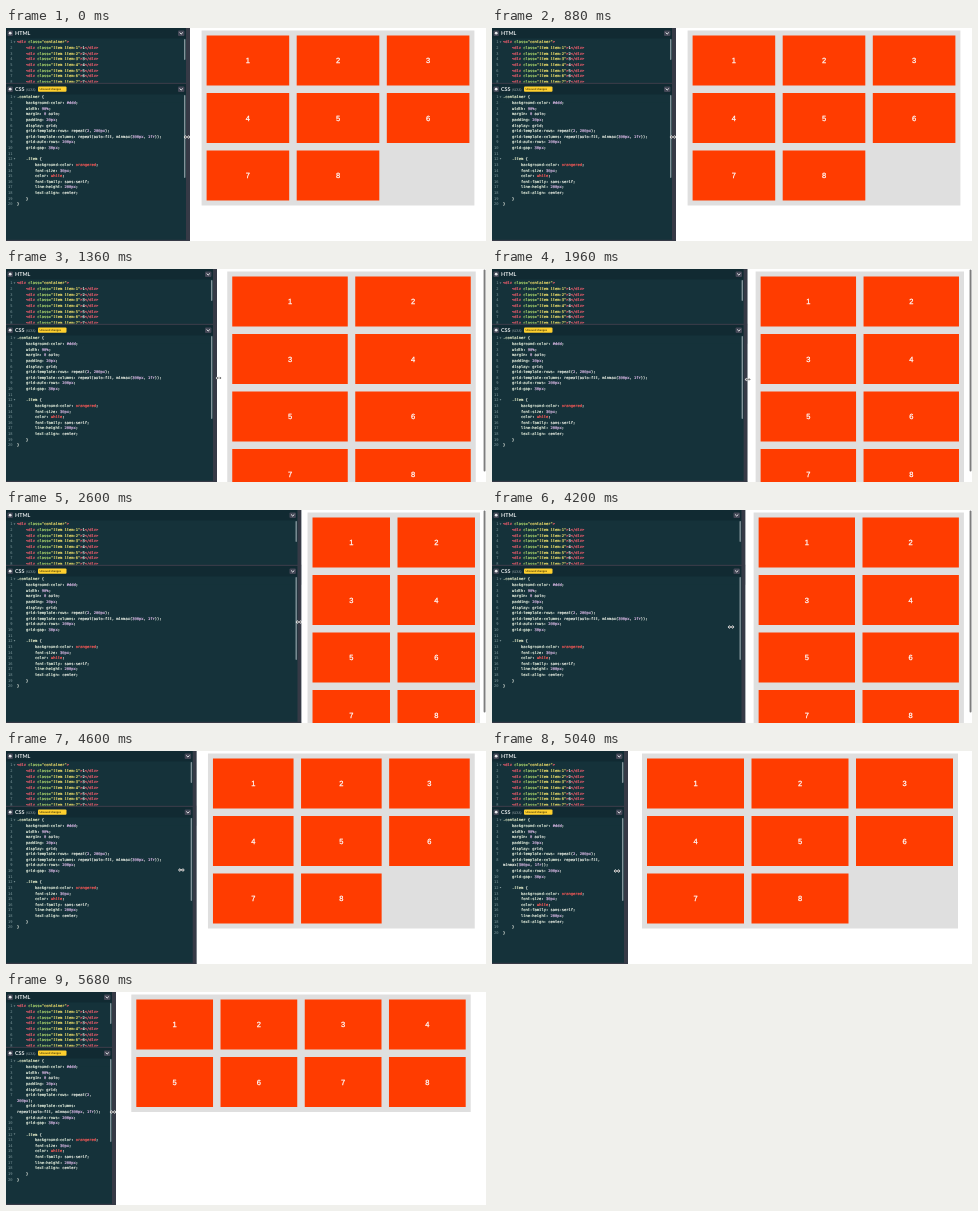
Write an HTML page that moves like this. It is 480 px wide and 213 px high and loops after 6160 ms.

```html
<!DOCTYPE html>
<html lang="en">
<head>
<meta charset="utf-8">
<title>Resizing a CSS grid</title>
<style>
  html, body { margin: 0; width: 100%; height: 100%; overflow: hidden; background: #fff; }
  svg { display: block; width: 100vw; height: 100vh; }
  text { white-space: pre; text-rendering: geometricPrecision; }
  .code { font: 3.75px "DejaVu Sans Mono", "Liberation Mono", monospace; color: #f0f4ea; stroke-width: 0.16; }
  .code, .code tspan { fill: currentColor; stroke: currentColor; }
  .num { color: #7f989c; text-anchor: end; stroke-width: 0; }
  .title { font: 700 5.4px Lato, "Open Sans", sans-serif; fill: #e4e8e9; }
  .small { font: 3.3px Lato, sans-serif; fill: #aab6b9; }
  .badge { font: 700 2.8px Lato, sans-serif; fill: #4a3d0c; }
  .cell { font: 7.5px "Liberation Sans", Arial, sans-serif; fill: #fff; stroke: #fff; stroke-width: 0.25; text-anchor: middle; }
</style>
</head>
<body>
<svg id="stage" viewBox="0 0 480 213" preserveAspectRatio="none"></svg>
<script>
const W = 480, H = 213, LOOP = 6160, STEP = 40;
const LINE = 5.625, CHAR = 2.258, TAB = 4 * CHAR, CODE_X = 11;
const PANEL = '#15323a', FRAME = '#363a46', BUTTON = '#444857';
const stage = document.getElementById('stage');

// Each key: time, left edge of the preview, cursor x, cursor y
const keys = [
  [1080, 184, 181, 109], [1360, 211, 213, 109], [2600, 295.5, 293, 112],
  [3520, 339, 337, 111], [4200, 253.5, 239, 117], [5040, 136, 125, 120],
  [5680, 110, 107, 120]
];

const htmlLines = [[0, '<div class="container">']];
for (let i = 1; i <= 7; i++) htmlLines.push([1, `<div class="item item-${i}">${i}</div>`]);

const cssLines = [
  [0, '.container {'],
  [1, 'background-color: #ddd;'],
  [1, 'width: 90%;'],
  [1, 'margin: 0 auto;'],
  [1, 'padding: 20px;'],
  [1, 'display: grid;'],
  [1, 'grid-template-rows: repeat(2, 200px);'],
  [1, 'grid-template-columns: repeat(auto-fit, minmax(300px, 1fr));'],
  [1, 'grid-auto-rows: 200px;'],
  [1, 'grid-gap: 30px;'],
  [0, ''],
  [1, '.item {'],
  [2, 'background-color: orangered;'],
  [2, 'font-size: 30px;'],
  [2, 'color: white;'],
  [2, 'font-family: sans-serif;'],
  [2, 'line-height: 200px;'],
  [2, 'text-align: center;'],
  [1, '}'],
  [0, '}']
];

const htmlRules = [
  [/"[^"]*"/, '#f5e36c'], [/class=?/, '#b2dc6e'], [/<\/?div|>/, '#ff6070']
];
const cssRules = [
  [/[\w-]+(?=:)/, '#e8f2e0'], [/\b(?:orangered|white)\b/, '#ff5a58'],
  [/#\w+|\d+(?:px|fr|%)?/, '#dfbcea'], [/\.\w+/, '#eef5d0']
];

const rect = (x, y, w, h, fill, rx = 0) =>
  `<rect x="${x}" y="${y}" width="${w}" height="${h}" fill="${fill}" rx="${rx}"/>`;
const label = (x, y, cls, s) => `<text x="${x}" y="${y}" class="${cls}">${s}</text>`;
const path = (d, stroke, width) =>
  `<path d="${d}" fill="none" stroke="${stroke}" stroke-width="${width}"/>`;
const escapeText = s => s.replace(/&/g, '&amp;').replace(/</g, '&lt;');

function colour(s, rules) {
  const any = new RegExp(rules.map(r => `(${r[0].source})`).join('|'), 'g');
  let out = '', last = 0;
  for (const m of s.matchAll(any)) {
    const rule = m.slice(1).findIndex(g => g !== undefined);
    out += escapeText(s.slice(last, m.index));
    out += `<tspan color="${rules[rule][1]}">${escapeText(m[0])}</tspan>`;
    last = m.index + m[0].length;
  }
  return out + escapeText(s.slice(last));
}

// Greedy word wrap; continued rows start at the code margin
function wrap(indent, s, right) {
  const rows = [{ x: CODE_X + indent * TAB, s: '' }];
  for (const word of s.split(' ')) {
    const row = rows[rows.length - 1];
    const joined = row.s ? row.s + ' ' + word : word;
    if (row.s && row.x + joined.length * CHAR > right) rows.push({ x: CODE_X, s: word });
    else row.s = joined;
  }
  return rows;
}

function code(lines, rules, firstY, right) {
  let out = '', y = firstY;
  lines.forEach(([indent, s], i) => {
    out += label(6.6, y, 'code num', i + 1);
    if (/\{$|container/.test(s)) out += `<path d="M7.6 ${y - 2}h1.8l-.9 1.3z" fill="#8fa5a8"/>`;
    for (const row of wrap(indent, s, right)) {
      out += label(row.x, y, 'code', colour(row.s, rules));
      y += LINE;
    }
  });
  return out;
}

// Monotone cubic through the keys
function slope(i, c) {
  if (i === 0 || i === keys.length - 1) return 0;
  const [a, b, d] = [keys[i - 1], keys[i], keys[i + 1]];
  const s = (b[c] - a[c]) / (b[0] - a[0]), r = (d[c] - b[c]) / (d[0] - b[0]);
  return s * r <= 0 ? 0 : 2 * s * r / (s + r);
}

function track(t, c) {
  const last = keys.length - 1;
  if (t <= keys[0][0]) return keys[0][c];
  if (t >= keys[last][0]) return keys[last][c];
  const i = keys.findIndex(k => k[0] > t) - 1;
  const a = keys[i], b = keys[i + 1], h = b[0] - a[0], u = (t - a[0]) / h, v = 1 - u;
  return a[c] * v * v * (1 + 2 * u) + b[c] * u * u * (3 - 2 * u)
    + h * u * v * (slope(i, c) * v - slope(i + 1, c) * u);
}

function preview(left) {
  const width = W - left, content = 0.9 * (width - 4);
  const top = 2.5, pad = 5, gap = 7.5, row = 50, viewport = 219;
  const cols = Math.max(1, Math.min(8, Math.floor((content + gap) / (75 + gap))));
  const rows = Math.ceil(8 / cols);
  const cell = (content - (cols - 1) * gap) / cols;
  const x0 = left + (width - content) / 2, y0 = top + pad;
  const inner = rows * (row + gap) - gap, total = inner + 2 * (pad + top);
  let out = rect(left, 0, width, H, '#fff');
  out += rect(x0 - pad, top, content + 2 * pad, inner + 2 * pad, '#dfdfdf');
  for (let i = 0; i < 8; i++) {
    const x = x0 + (i % cols) * (cell + gap), y = y0 + Math.floor(i / cols) * (row + gap);
    out += rect(x, y, cell, row, '#ff3c00') + label(x + cell / 2, y + row / 2 + 2.6, 'cell', i + 1);
  }
  if (total > viewport) out += rect(477.6, 0.5, 1.9, viewport * viewport / total, '#7d7d7d', 0.9);
  return out;
}

function header(y, title, left) {
  const x = left - 9;
  return rect(0, y, left - 4, 10.5, '#112a32')
    + rect(1.5, y + 2.5, 5.4, 5.4, BUTTON, 1)
    + `<circle cx="4.2" cy="${y + 5.2}" r="1.4" fill="#e4e8e9"/>`
    + label(9, y + 7.3, 'title', title)
    + rect(x - 3, y + 2.5, 6.4, 5.4, BUTTON, 1)
    + path(`M${x - 1.4} ${y + 4.5}l1.6 1.5l1.6-1.5`, '#fff', 0.9);
}

function editors(left) {
  const right = left - 7.5;
  return rect(0, 0, left, H, PANEL)
    + code(htmlLines, htmlRules, 15.4, right)
    + rect(0, 54.8, left, 20, PANEL)
    + rect(0, 54.8, left, 1.4, FRAME)
    + header(0, 'HTML', left)
    + header(56, 'CSS', left)
    + label(20, 62.7, 'small', '(SCSS)')
    + rect(32, 58.6, 28.5, 5.2, '#ffd02e', 1)
    + label(33.5, 62.2, 'badge', 'Unsaved changes')
    + code(cssLines, cssRules, 70.4, right)
    + rect(left - 6, 11, 1.4, 21, '#82939a', 0.7)
    + rect(left - 6, 67, 1.4, 83, '#82939a', 0.7)
    + rect(left - 4, 0, 4, H, FRAME)
    + rect(0, 211.8, left, 1.2, FRAME);
}

function cursor(x, y) {
  const d = `M${x - 2} ${y}h4M${x - 1} ${y - 1.1}l-1.1 1.1l1.1 1.1M${x + 1} ${y - 1.1}l1.1 1.1l-1.1 1.1`;
  return path(d, '#fff', 1.7) + path(d, '#222', 0.5);
}

function draw(t) {
  const left = track(t, 1);
  stage.innerHTML = editors(left) + preview(left) + cursor(track(t, 2), track(t, 3));
}

const start = performance.now();
let shown = -1;
function tick() {
  const t = Math.floor((performance.now() - start) % LOOP / STEP) * STEP;
  if (t !== shown) draw(shown = t);
  requestAnimationFrame(tick);
}
tick();
</script>
</body>
</html>
```
